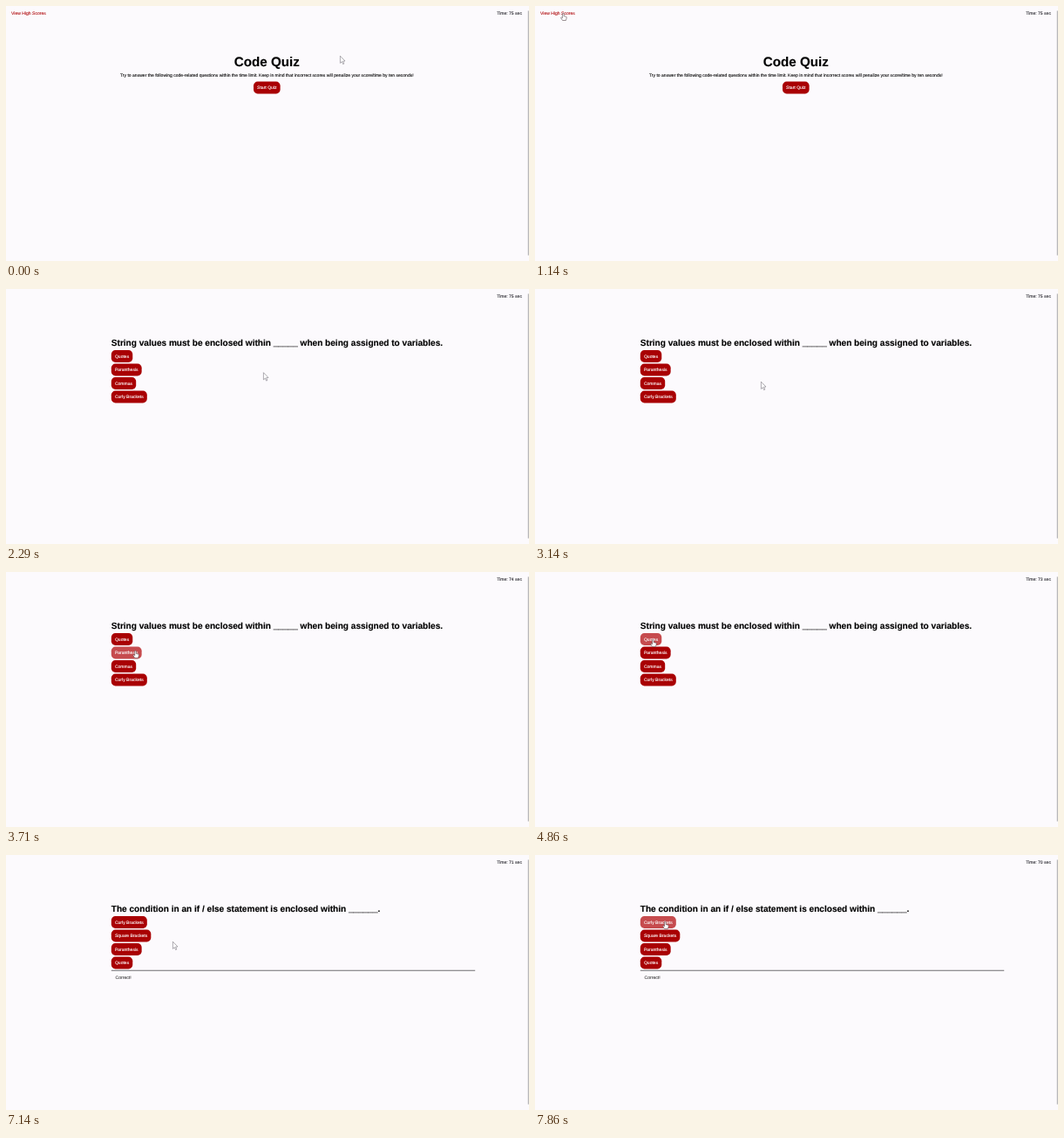
An HTML page with a canvas that plays this animation: 600x292 px, repeating every 8000 ms.

```html
<!DOCTYPE html>
<html lang="en">
<head>
<meta charset="utf-8">
<title>Code Quiz</title>
<style>
  html, body { margin: 0; height: 100%; overflow: hidden; background: #fcfafd; }
  canvas { display: block; width: 600px; height: 292px; }
</style>
</head>
<body>
<canvas id="stage"></canvas>
<script>
const LOOP = 8000, FPS = 7, EM = 5.05, LEFT = 120.8, CENTER = 299.3;
const BACKGROUND = '#fcfafd', RED = '#a90003', HOVER = '#c64b4e';

const canvas = document.getElementById('stage');
const ctx = canvas.getContext('2d');
const ratio = window.devicePixelRatio || 1;
canvas.width = 600 * ratio;
canvas.height = 292 * ratio;

const questions = [
  { from: 2280, title: 'String values must be enclosed within _____ when being assigned to variables.',
    answers: ['Quotes', 'Paranthesis', 'Commas', 'Curly Brackets'] },
  { from: 5850, title: 'The condition in an if / else statement is enclosed within ______.',
    answers: ['Curly Brackets', 'Square Brackets', 'Paranthesis', 'Quotes'], feedback: 'Correct!' }
];

// Each sweep eases to a resting place, sagging below the straight line
const home = { x: 383, y: 57 };
const sweeps = [
  { start: 0, end: 1140, x: 32, y: 8, sag: 100 },      // link
  { start: 1140, end: 2000, x: 295, y: 95.5, sag: 80 },  // start button
  { start: 2570, end: 3140, x: 259, y: 106, sag: 0 },
  { start: 3140, end: 3860, x: 135, y: 77, sag: 30 },  // first answer
  { start: 5860, end: 7140, x: 191, y: 99, sag: 14 },
  { start: 7140, end: 7860, x: 149, y: 76, sag: 14 }   // next answer
];

function pointerAt(t) {
  let { x, y } = home;
  for (const s of sweeps) {
    const k = Math.min(1, Math.max(0, (t - s.start) / (s.end - s.start)));
    const eased = k * k * (3 - 2 * k);
    x += (s.x - x) * eased;
    y += (s.y - y) * eased + s.sag * Math.sin(Math.PI * eased);
  }
  return { x, y };
}

function setFont(size, weight = '') {
  ctx.font = `${weight} ${size}px Arial, "Liberation Sans", sans-serif`;
}

// A hairline stroke gives small type the weight of downscaled screen text
function text(str, x, y, { color = '#111', size = EM, weight = '', align = 'left' } = {}) {
  setFont(size, weight);
  ctx.textAlign = align;
  ctx.fillStyle = ctx.strokeStyle = color;
  ctx.lineWidth = .12;
  ctx.fillText(str, x, y);
  ctx.strokeText(str, x, y);
}

// Draws a rounded button and returns whether the pointer is over it
function button(label, x, y, pointer, centered) {
  setFont(EM);
  const pad = 4.1, w = ctx.measureText(label).width + pad * 2, h = 13.9;
  if (centered) x -= w / 2;
  const over = pointer.x >= x && pointer.x <= x + w && pointer.y >= y && pointer.y <= y + h;
  ctx.fillStyle = over ? HOVER : RED;
  ctx.beginPath();
  ctx.roundRect(x, y, w, h, 4.7);
  ctx.fill();
  text(label, x + pad, y + 8.6, { color: '#fff' });
  return over;
}

function drawPointer({ x, y }, hand) {
  const shape = new Path2D(hand
    ? 'M-.8 .6Q0-.5 .8 .6V3.4L3.4 4Q4 4.3 3.8 5.6L3 8.3H-.8L-2.8 5.3Q-2.6 4.2-.8 5.4Z'
    : 'M0 0V8.2L1.9 6.5 3.2 9.4 4.4 8.9 3.2 6 5.6 5.8Z');
  ctx.save();
  ctx.translate(x + .4, y + .2);
  ctx.fillStyle = '#fff';
  ctx.strokeStyle = hand ? '#5c4a50' : '#77757c';
  ctx.lineWidth = .6;
  ctx.fill(shape);
  ctx.stroke(shape);
  ctx.restore();
}

function drawWelcome(pointer) {
  text('View High Scores', 6, 10.3, { color: '#b5191c' });
  text('Code Quiz', CENTER, 69.2, { color: '#000', size: 15.15, weight: 'bold', align: 'center' });
  text('Try to answer the following code-related questions within the time limit. ' +
    'Keep in mind that incorrect scores will penalize your score/time by ten seconds!',
    CENTER, 80.8, { align: 'center' });
  const overLink = pointer.x < 47 && pointer.y < 12;
  return button('Start Quiz', CENTER, 86.5, pointer, true) || overLink;
}

function drawQuestion({ title, answers, feedback }, pointer) {
  text(title, LEFT, 65.4, { color: '#000', size: 10.08, weight: 'bold' });
  if (feedback) {
    ctx.fillStyle = '#4c4b4e';
    ctx.fillRect(LEFT, 131.8, 417.4, .8);
    text(feedback, 125.6, 141.7, { color: '#444' });
  }
  return answers.map((label, i) => button(label, LEFT, 70.1 + i * 15.47, pointer)).includes(true);
}

function draw(t) {
  ctx.setTransform(ratio, 0, 0, ratio, 0, 0);
  ctx.textRendering = 'geometricPrecision';
  ctx.lineJoin = 'round';
  ctx.fillStyle = BACKGROUND;
  ctx.fillRect(0, 0, 600, 292);
  ctx.fillStyle = '#b9b8ba';
  ctx.fillRect(598.7, 5.5, 1.3, 280);

  const pointer = pointerAt(t);
  const question = questions.filter(q => t >= q.from).pop();
  const elapsed = Math.max(0, Math.floor((t - questions[0].from) / 1000));
  text(`Time: ${75 - elapsed} sec`, 563.2, 10.3, { color: '#333238' });
  const hand = question ? drawQuestion(question, pointer) : drawWelcome(pointer);
  drawPointer(pointer, hand);
}

function tick() {
  const step = Math.floor((performance.now() % LOOP + 4) * FPS / 1000);
  draw(step * 1000 / FPS % LOOP);
  requestAnimationFrame(tick);
}
tick();
</script>
</body>
</html>
```
